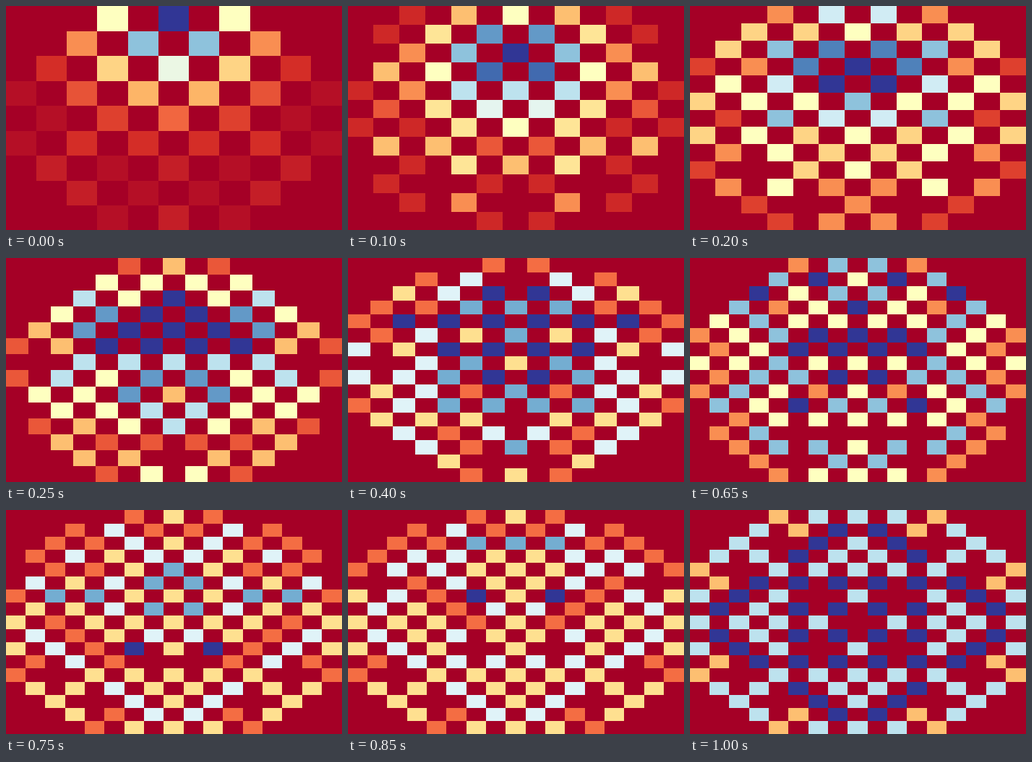
An HTML page with a canvas for the animation above (1.25 s loop, 465 by 310 pixels).

```html
<!DOCTYPE html>
<html lang="en">
<head>
<meta charset="utf-8">
<title>Diagonal sandpile</title>
<style>
  html, body { margin: 0; width: 100%; height: 100%; overflow: hidden; background: #a50026; }
  canvas { display: block; }
</style>
</head>
<body>
<canvas id="stage" width="465" height="310"></canvas>
<script>
const W = 465, H = 310, SIZE = 25, MID = 12;
const GRAINS = 256, STEPS = 21, STEP_MS = 50, LOOP_MS = 1250;
const ctx = document.getElementById('stage').getContext('2d');

// Red-yellow-blue colour scale, evenly spaced stops
const stops = ['a50026', 'd73027', 'f46d43', 'fdae61', 'fee090', 'ffffbf',
  'e0f3f8', 'abd9e9', '74add1', '4575b4', '313695']
  .map(hex => [0, 2, 4].map(i => parseInt(hex.slice(i, i + 2), 16)));

function color(level) {
  const pos = Math.min(255, Math.floor(level * 256)) / 255 * 10;
  const i = Math.min(9, Math.floor(pos));
  const rgb = stops[i].map((c, k) => Math.round(c + (stops[i + 1][k] - c) * (pos - i)));
  return `rgb(${rgb})`;
}

// One top-to-bottom sweep: each pile sends a quarter to every diagonal neighbour
function sweep(grid) {
  for (let y = 1; y < SIZE - 1; y++) {
    for (let x = 1; x < SIZE - 1; x++) {
      const share = Math.floor(grid[y][x] / 4);
      if (!share) continue;
      grid[y][x] %= 4;
      for (const dy of [-1, 1]) {
        for (const dx of [-1, 1]) grid[y + dy][x + dx] += share;
      }
    }
  }
}

// Trim empty rows and columns
function crop(grid) {
  const xs = [], ys = [];
  grid.forEach((row, y) => row.forEach((n, x) => {
    if (n) { xs.push(x); ys.push(y); }
  }));
  const left = Math.min(...xs), right = Math.max(...xs);
  return grid.slice(Math.min(...ys), Math.max(...ys) + 1)
    .map(row => row.slice(left, right + 1));
}

const pile = Array.from({ length: SIZE }, () => Array(SIZE).fill(0));
pile[MID][MID] = GRAINS;
sweep(pile);
const states = Array.from({ length: STEPS }, () => {
  sweep(pile);
  return crop(pile);
});

function draw(cells) {
  const rows = cells.length, cols = cells[0].length;
  const max = Math.max(...cells.flat());
  // Cells snap to whole pixels, measured from the bottom left corner
  const edgeX = i => Math.floor(i * W / cols);
  const edgeY = i => Math.ceil(i * H / rows);
  cells.forEach((row, y) => row.forEach((n, x) => {
    ctx.fillStyle = color(n / max);
    ctx.fillRect(edgeX(x), edgeY(y), edgeX(x + 1) - edgeX(x), edgeY(y + 1) - edgeY(y));
  }));
}

function tick() {
  const time = performance.now() % LOOP_MS;
  draw(states[Math.min(STEPS - 1, Math.floor(time / STEP_MS))]);
  requestAnimationFrame(tick);
}
tick();
</script>
</body>
</html>
```
